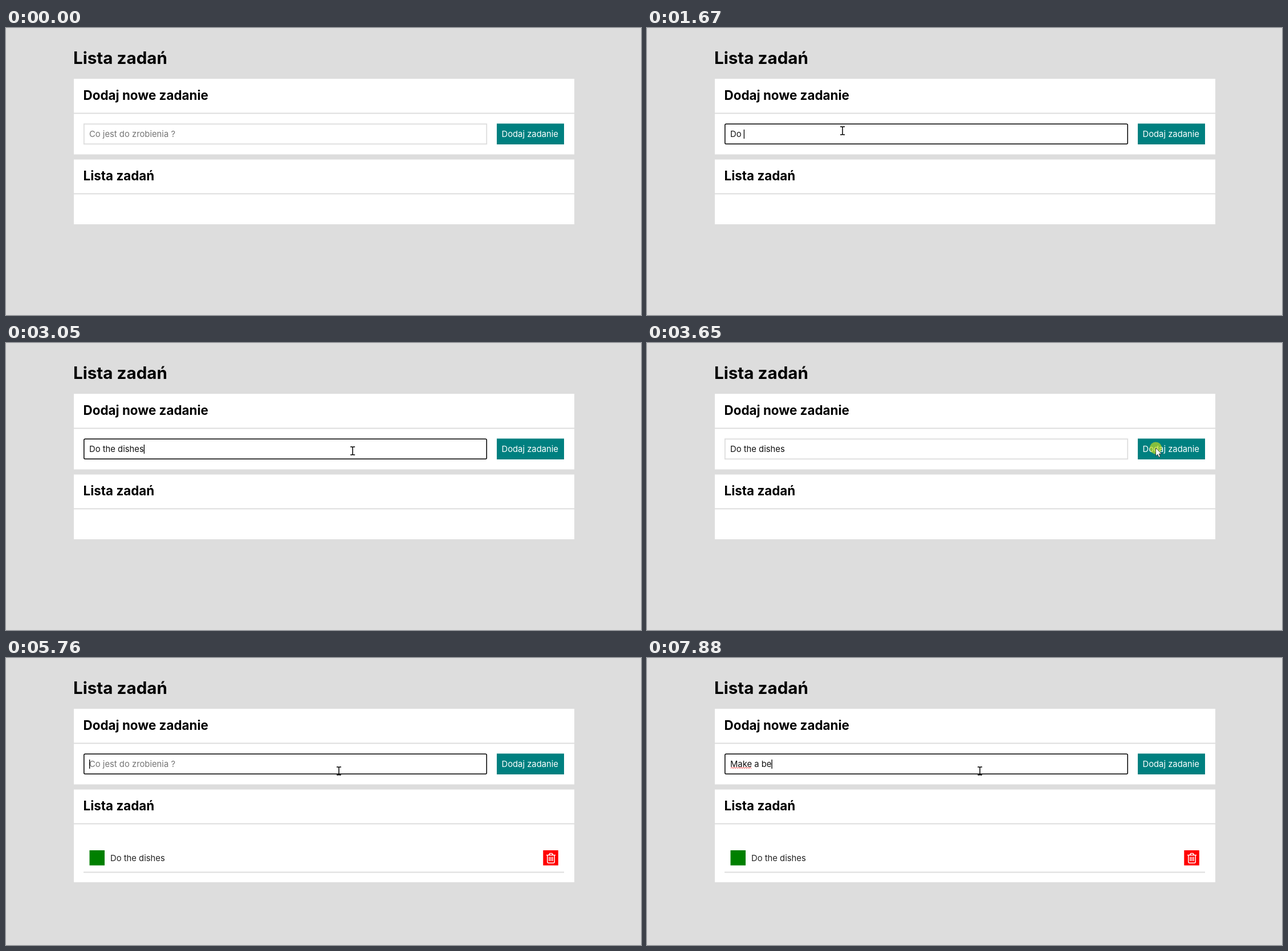
An HTML page that plays this animation: 1114 by 503 pixels, repeating every 8 s.

```html
<!DOCTYPE html>
<html lang="pl">
<head>
<meta charset="utf-8">
<title>Lista zadań</title>
<style>
  html, body { margin: 0; width: 100%; height: 100%; overflow: hidden; background: #ddd; }
  svg { display: block; }
  text { font: 14.8px Inter, sans-serif; font-optical-sizing: none; white-space: pre; }
  .title { font-size: 29.6px; font-weight: 700; }
  .heading { font-size: 22.4px; font-weight: 700; }
  .card { fill: #fff; }
  .rule { fill: #ddd; }
</style>
</head>
<body>
<svg width="1114" height="503" viewBox="0 0 1114 503">
  <text class="title" x="118" y="63">Lista zadań</text>

  <rect class="card" x="119" y="89" width="878" height="132.5"/>
  <text class="heading" x="135.5" y="126">Dodaj nowe zadanie</text>
  <rect class="rule" x="119" y="148.5" width="878" height="2"/>
  <rect id="field" x="136.8" y="168.3" width="706.4" height="35" fill="#fff"/>
  <text id="entry" x="146" y="191"></text>
  <path id="squiggle" fill="none" stroke="#e22" stroke-width="1"/>
  <rect id="caret" y="178" width="1.3" height="16"/>
  <rect x="861" y="167.5" width="118" height="36.5" fill="teal"/>
  <text x="869.5" y="191" fill="#fff">Dodaj zadanie</text>

  <rect class="card" id="list" x="119" y="230.5" width="878"/>
  <text class="heading" x="135.5" y="267">Lista zadań</text>
  <rect class="rule" x="119" y="289.5" width="878" height="2"/>
  <g id="task">
    <rect x="146.5" y="337" width="26.5" height="26.5" fill="green"/>
    <text x="183" y="355.5" fill="#222">Do the dishes</text>
    <rect x="942.3" y="337" width="26.5" height="26.5" fill="red"/>
    <path d="M948 345.5H964M952.5 345l1.5-2.5h4l1.5 2.5M949.8 346v11.2q0 2 2 2h8.4q2 0 2-2V346M953.2 348.5v7.5M956 348.5v7.5M958.8 348.5v7.5"
          fill="none" stroke="#fff" stroke-width="1.5"/>
    <rect class="rule" x="136" y="374.5" width="843" height="2"/>
  </g>

  <circle id="press" r="10.5" fill="#cce01a" opacity=".65"/>
  <path id="beam" d="M-4-7H-1L0-6 1-7H4M0-6V6M-4 7H-1L0 6 1 7H4" fill="none" stroke="#000" stroke-width="1.5"/>
  <path id="arrow" d="M0 0V14.2L3.3 11.2 5.5 16.3 8 15.2 5.8 10.2H10.2Z" fill="#fff" stroke="#222" stroke-width=".8"/>
</svg>
<script>
const LOOP = 8000;
const PLACEHOLDER = 'Co jest do zrobienia ?';
const el = Object.fromEntries([...document.querySelectorAll('[id]')].map(node => [node.id, node]));

// Each session: focus interval, submit time, text and the time of every keystroke.
const sessions = [
  { focus: 1070, blur: 3650, submit: 4840, text: 'Do the dishes',
    keys: [1410, 1530, 1650, 1770, 1890, 2010, 2130, 2260, 2330, 2530, 2600, 2670, 2740] },
  { focus: 5370, blur: LOOP, submit: LOOP, text: 'Make a be',
    keys: [6420, 6560, 6750, 6890, 7080, 7220, 7350, 7610, 7880] },
];
const presses = [[1070, 1270], [3650, 4840], [5370, 5500]];

// Pointer path as [time, x, y].
const path = [
  [70, 660, 503], [400, 517, 198], [500, 423, 155], [600, 360, 146], [680, 343, 176], [880, 343, 180],
  [2800, 343, 180], [3080, 640, 190], [3250, 785, 207], [3450, 892.5, 184],
  [4840, 892.5, 184], [5100, 584, 198], [LOOP, 584, 198],
];

const show = (node, visible) => node.setAttribute('visibility', visible ? 'visible' : 'hidden');
const place = (node, x, y) => node.setAttribute('transform', `translate(${x} ${y})`);

function pointerAt(t) {
  const i = Math.max(1, path.findIndex(point => point[0] > t));
  const [t0, x0, y0] = path[i - 1], [t1, x1, y1] = path[i];
  const k = Math.max(0, (t - t0) / (t1 - t0));
  return [x0 + (x1 - x0) * k, y0 + (y1 - y0) * k];
}

function drawPointer(t) {
  const [x, y] = pointerAt(t);
  const overField = x > 136 && x < 844 && y > 167 && y < 205;
  place(el.beam, x, y);
  place(el.arrow, x, y);
  place(el.press, x, y);
  show(el.beam, t >= 70 && overField);
  show(el.arrow, t >= 70 && !overField);
  show(el.press, presses.some(([from, to]) => t >= from && t < to));
}

function drawField(t) {
  const session = sessions.find(s => t < s.submit);
  const typed = session.keys.filter(time => time <= t).length;
  const text = session.text.slice(0, typed);
  const focused = t >= session.focus && t < session.blur;
  const lastInput = typed ? session.keys[typed - 1] : session.focus;

  el.field.setAttribute('stroke', focused ? '#000' : '#ddd');
  el.field.setAttribute('stroke-width', focused ? 1.5 : 1.8);
  el.field.setAttribute('rx', focused ? 2 : 0);

  el.entry.textContent = text || PLACEHOLDER;
  el.entry.setAttribute('fill', text ? '#111' : '#757575');
  el.caret.setAttribute('x', 146 + (text ? el.entry.getComputedTextLength() : 0));
  show(el.caret, focused && (t - lastInput) % 1000 < 500);

  const misspelt = text.startsWith('Make ');
  show(el.squiggle, misspelt);
  if (misspelt) {
    const waves = Math.floor(el.entry.getSubStringLength(0, 4) / 4);
    el.squiggle.setAttribute('d', 'M147 193.5' + 'l2-2 2 2'.repeat(waves));
  }
}

function draw(now) {
  const t = now % LOOP;
  const added = t >= sessions[0].submit;
  el.list.setAttribute('height', added ? 162.5 : 113.5);
  show(el.task, added);
  drawField(t);
  drawPointer(t);
}

let start;
function tick(now) {
  start ??= now;
  draw(now - start);
  requestAnimationFrame(tick);
}
draw(0);
requestAnimationFrame(tick);
</script>
</body>
</html>
```
